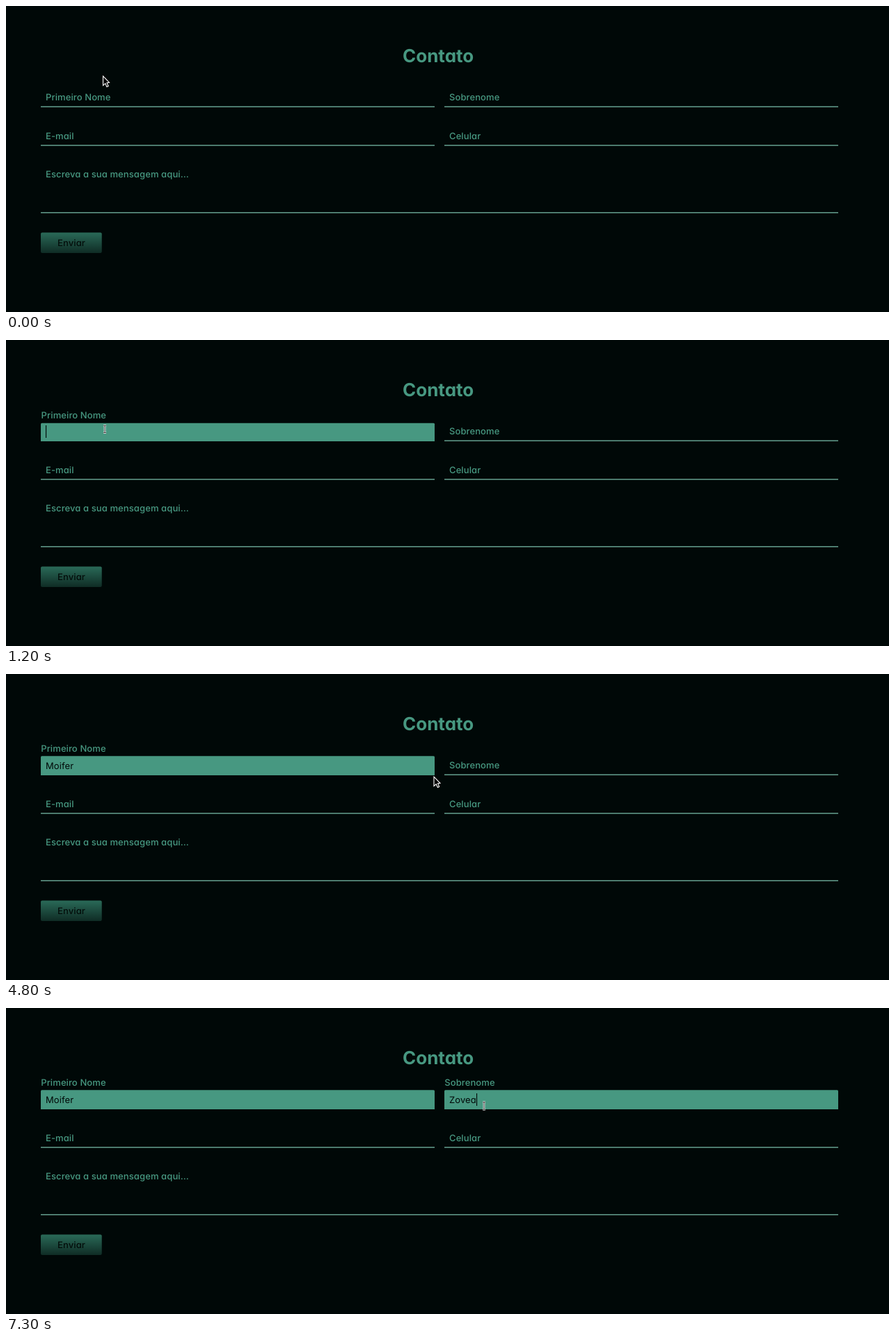
Write an HTML page that moves like this. It is 1269 px wide and 441 px high and loops after 8 s.

```html
<!DOCTYPE html>
<html lang="pt-BR">
<head>
<meta charset="utf-8">
<title>Contato</title>
<style>
  html, body { margin: 0; width: 100%; height: 100%; overflow: hidden; background: #000807; }
  svg { display: block; }
  text {
    font: 500 13px Inter, "Open Sans", sans-serif;
    font-feature-settings: "cv11";
    letter-spacing: .1px;
    white-space: pre;
    text-rendering: geometricPrecision;
    fill: #479881;
  }
  .title { font-size: 26px; font-weight: 700; letter-spacing: 0; }
  .typed { font-weight: 400; fill: #000807; }
  .send { fill: #030d0a; text-anchor: middle; }
  .line { fill: #5f9686; }
  .fill { fill: #479881; }
  .caret { fill: #000807; }
</style>
</head>
<body>
<svg id="stage" width="1269" height="441" viewBox="0 0 1269 441">
  <defs>
    <linearGradient id="shade" x1="0" y1="0" x2="0" y2="1">
      <stop offset="0" stop-color="#2a6a58"/>
      <stop offset="1" stop-color="#0f2c25"/>
    </linearGradient>
  </defs>
  <rect width="1269" height="441" fill="#000807"/>
  <text class="title" x="570" y="80.5">Contato</text>
  <g id="form"></g>
  <rect x="50" y="326.5" width="87.7" height="29.5" rx="2" fill="url(#shade)"/>
  <text class="send" x="94" y="346.3">Enviar</text>
  <g id="arrow">
    <path d="M0 0V13.5L3.2 10.7L5.4 15.4L7.6 14.4L5.5 9.8L9 9.3Z" fill="#000" stroke="#fff" stroke-width="1.1"/>
  </g>
  <g id="beam" fill="none">
    <path d="M-2 -5.2H2M0 -5.2V5.2M-2 5.2H2" stroke="#fff" stroke-width="2.6"/>
    <path d="M-2 -5.2H2M0 -5.2V5.2M-2 5.2H2" stroke="#111" stroke-width=".9"/>
  </g>
</svg>
<script>
const LOOP = 8000, STEP = 100, GROW = 500;
const form = document.getElementById('form');
const arrow = document.getElementById('arrow');
const beam = document.getElementById('beam');

function add(tag, attrs, content = '') {
  const el = document.createElementNS('http://www.w3.org/2000/svg', tag);
  for (const k in attrs) el.setAttribute(k, attrs[k]);
  el.textContent = content;
  return form.appendChild(el);
}

function show(el, on) {
  el.setAttribute('visibility', on ? 'visible' : 'hidden');
}

// A field is an underline with its label above it
function field(x, bottom, width, label, drop = 10) {
  add('rect', { class: 'line', x, y: bottom - 1.6, width, height: 1.6 });
  const fill = add('rect', { class: 'fill', x, width, rx: 1.5 });
  const name = add('text', { x: x + 7, y: bottom - drop }, label);
  const typed = add('text', { class: 'typed', x: x + 7, y: bottom - 9.4 });
  const caret = add('rect', { class: 'caret', y: bottom - 23, width: 1.1, height: 18 });
  show(fill, false);
  show(caret, false);
  return { x, bottom, fill, name, typed, caret };
}

const first = field(50, 146, 566, 'Primeiro Nome');
const last = field(630, 146, 566, 'Sobrenome');
field(50, 201.6, 566, 'E-mail');
field(630, 201.6, 566, 'Celular');
field(50, 298.6, 1146, 'Escreva a sua mensagem aqui...', 51.2);

Object.assign(first, {
  focus: 850, value: 'Moifer ',
  keys: [2200, 2300, 2800, 3200, 3300, 3400, 3600],
  caretOn: [[900, 1400], [2200, 4200], [4900, 5100]]
});
Object.assign(last, {
  focus: 5110, value: 'Zovea',
  keys: [6100, 6600, 6800, 7100, 7300],
  caretOn: [[5200, 5700], [6100, LOOP]]
});

// Pointer hot spot: time, x, y
const path = [
  [100, 139.5, 101], [400, 139.5, 109], [700, 142, 128.5],
  [4300, 142, 128.5], [4400, 146, 135.5], [4500, 146, 135.5],
  [4600, 240, 141], [4700, 430, 144], [4800, 615, 148],
  [4900, 672, 158], [5000, 688, 152], [5100, 687, 141]
];

// cubic-bezier(.25, .1, .25, 1)
function ease(u) {
  if (u <= 0) return 0;
  if (u >= 1) return 1;
  const bez = (a, b, s) => 3 * a * s * (1 - s) ** 2 + 3 * b * s * s * (1 - s) + s ** 3;
  let lo = 0, hi = 1;
  for (let i = 0; i < 24; i++) {
    const mid = (lo + hi) / 2;
    if (bez(.25, .25, mid) < u) lo = mid; else hi = mid;
  }
  return bez(.1, 1, lo);
}

function pointerAt(t) {
  let a = path[0];
  for (const b of path) {
    if (t <= b[0]) {
      const u = b === a ? 0 : Math.max(0, (t - a[0]) / (b[0] - a[0]));
      return [a[1] + (b[1] - a[1]) * u, a[2] + (b[2] - a[2]) * u];
    }
    a = b;
  }
  return [a[1], a[2]];
}

function drawField(f, t) {
  const p = ease((t - f.focus) / GROW);
  const height = 1.6 + 26.2 * p;
  show(f.fill, p > 0);
  f.fill.setAttribute('y', f.bottom - height);
  f.fill.setAttribute('height', height);
  f.name.setAttribute('x', f.x + 7 - 6.8 * p);
  f.name.setAttribute('y', f.bottom - 10 - 24 * p);

  f.typed.textContent = f.value.slice(0, f.keys.filter(k => k <= t).length);
  const width = f.typed.textContent ? f.typed.getComputedTextLength() : 0;
  f.caret.setAttribute('x', Math.round(f.x + 7 + width));
  show(f.caret, f.caretOn.some(([on, off]) => t >= on && t < off));
}

function drawPointer(t) {
  const [x, y] = pointerAt(t);
  const inField = y >= 118 && y < 146;
  const place = `translate(${x} ${y})`;
  arrow.setAttribute('transform', place);
  beam.setAttribute('transform', place);
  show(arrow, !inField);
  show(beam, inField);
}

const start = performance.now();
function tick() {
  const now = Math.max(0, performance.now() - start) % LOOP;
  const t = Math.floor(now / STEP) * STEP;
  drawField(first, t);
  drawField(last, t);
  drawPointer(t);
  requestAnimationFrame(tick);
}
tick();
</script>
</body>
</html>
```
